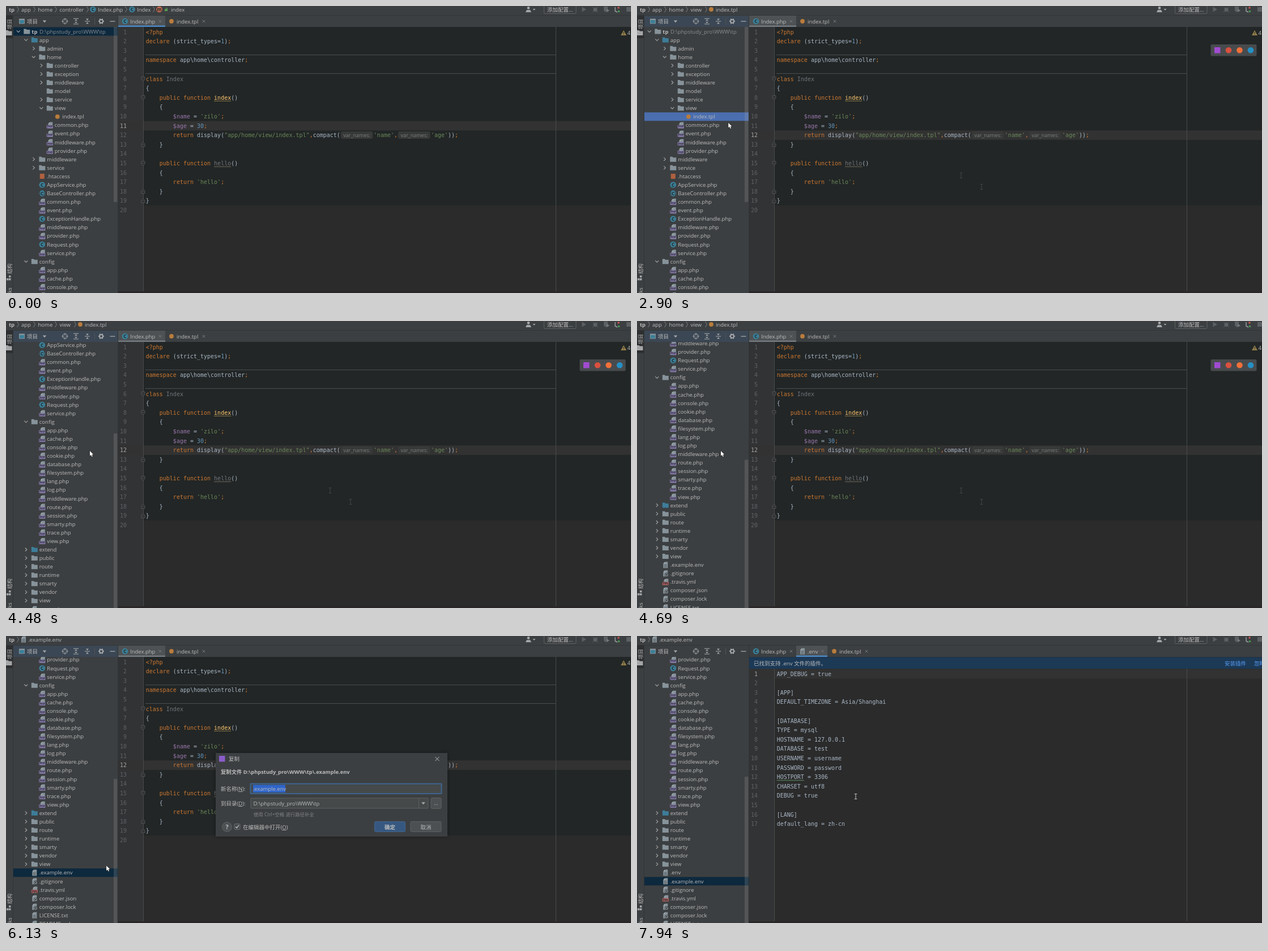
Recreate the animation shown at these times as an HTML page with a canvas. Size 1103 by 508 pixels, loop 8 s.

```html
<!DOCTYPE html>
<html lang="zh">
<head>
<meta charset="utf-8">
<title>IDE</title>
<style>
html, body { margin: 0; width: 100%; height: 100%; overflow: hidden; background: #2b2b2b; }
canvas { display: block; }
</style>
</head>
<body>
<canvas id="stage" width="1103" height="508"></canvas>
<script>
const g = document.getElementById('stage').getContext('2d');
const FAMILY = '"Open Sans", "Noto Sans CJK SC", "Noto Sans CJK", sans-serif';
const UI = '9.5px ' + FAMILY, BOLD = 'bold ' + UI, SMALL = '8.4px ' + FAMILY;
const MONO = '10px "DejaVu Sans Mono", monospace';
const CHAR = 6.02, LINE = 16.6, ROW = 15.08;
const PANEL = '#3c3f41', FG = '#bbbbbb', ICON = '#a4a6a8', CODE = '#a9b7c6', DIM = '#606366';

// moments of hard change, in ms
const POPUP = 470, CLICK_CODE = 1380, CLICK_TPL = 2760, SCROLL = 4340, CLICK_ENV = 5700,
  DIALOG = 6130, RENAME = 6930, CLOSE = 7130, OPEN = 7200, SQUIGGLE = 7460;

// depth, kind, name
const TREE = `0vtp
1oapp
2>admin
2vhome
3>controller
3>exception
3>middleware
3dmodel
3>service
3vview
4tindex.tpl
3pcommon.php
3pevent.php
3pmiddleware.php
3pprovider.php
2>middleware
2>service
2h.htaccess
2cAppService.php
2aBaseController.php
2pcommon.php
2pevent.php
2cExceptionHandle.php
2pmiddleware.php
2pprovider.php
2cRequest.php
2pservice.php
1vconfig
2papp.php
2pcache.php
2pconsole.php
2pcookie.php
2pdatabase.php
2pfilesystem.php
2plang.php
2plog.php
2pmiddleware.php
2proute.php
2psession.php
2psmarty.php
2ptrace.php
2pview.php
1eextend
1>public
1>route
1>runtime
1>smarty
1>vendor
1>view
1x.example.env
1g.gitignore
1y.travis.yml
1jcomposer.json
1jcomposer.lock
1xLICENSE.txt
1xREADME.md`.split('\n');
const TREE_NEW = TREE.flatMap(r => r === '1x.example.env' ? ['1x.env', r] : [r]);

const PHP = String.raw`<?php
declare (strict_types=1);

namespace app\home\controller;

class Index
{
    public function index()
    {
        $name = 'zilo';
        $age = 30;
        return display("app/home/view/index.tpl",compact(@'name',@'age'));
    }

    public function hello()
    {
        return 'hello';
    }
}
`.split('\n');

const ENV = `APP_DEBUG = true

[APP]
DEFAULT_TIMEZONE = Asia/Shanghai

[DATABASE]
TYPE = mysql
HOSTNAME = 127.0.0.1
DATABASE = test
USERNAME = username
PASSWORD = password
HOSTPORT = 3306
CHARSET = utf8
DEBUG = true

[LANG]
default_lang = zh-cn`.split('\n');

// pointer path: time, x, y
const PATH = [[400, 950, 465], [610, 682, 346], [680, 608, 320], [750, 572, 300], [960, 474, 237],
  [1180, 500, 231], [1580, 500, 231], [1860, 278, 231], [2130, 150, 208], [2430, 121, 201],
  [2760, 121, 201], [3520, 338, 232], [3590, 349, 232], [3720, 349, 232], [4010, 148, 230],
  [5230, 148, 230], [5500, 103, 420], [5600, 104, 428], [5910, 103, 419], [6060, 103, 419],
  [6330, 385, 371], [7800, 385, 371], [7940, 386, 284], [8000, 386, 284]];

function rect(x, y, w, h, fill) { g.fillStyle = fill; g.fillRect(x, y, w, h); }
function box(x, y, w, h, fill, stroke, r = 2, width = 1) {
  g.beginPath();
  g.roundRect(x, y, w, h, r);
  if (fill) { g.fillStyle = fill; g.fill(); }
  if (stroke) { g.strokeStyle = stroke; g.lineWidth = width; g.stroke(); }
}
function trace(x, y, pts) {
  g.beginPath();
  for (let i = 0; i < pts.length; i += 2) g.lineTo(x + pts[i], y + pts[i + 1]);
}
function poly(x, y, fill, ...pts) { trace(x, y, pts); g.fillStyle = fill; g.fill(); }
function line(x, y, stroke, width, ...pts) {
  trace(x, y, pts);
  g.strokeStyle = stroke; g.lineWidth = width; g.stroke();
}
function dot(x, y, r, fill) { g.beginPath(); g.arc(x, y, r, 0, 7); g.fillStyle = fill; g.fill(); }
function ring(x, y, r, stroke, width = 1) {
  g.beginPath(); g.arc(x, y, r, 0, 7);
  g.strokeStyle = stroke; g.lineWidth = width; g.stroke();
}
// y is the middle of the line
function text(s, x, y, fill = FG, font = UI, align = 'left') {
  g.font = font; g.fillStyle = fill; g.textAlign = align;
  g.fillText(s, x, y + 3.5);
  return g.measureText(s).width;
}
function upright(s, x, y, fill = FG) {
  g.save(); g.translate(x, y); g.rotate(-Math.PI / 2);
  text(s, 0, 0, fill, '9px ' + FAMILY, 'center');
  g.restore();
}
function squiggle(x, y, w, color) {
  const pts = [];
  for (let i = 0; i <= w; i += 1.5) pts.push(i, i / 1.5 % 2 ? -0.8 : 0.8);
  line(x, y, color, 0.9, ...pts);
}
function chevron(x, y, open) {
  if (open) line(x, y, ICON, 1.1, -3, -1.6, 0, 1.5, 3, -1.6);
  else line(x, y, ICON, 1.1, -1.5, -3, 1.6, 0, -1.5, 3);
}
function cross(x, y, r, color) {
  line(x, y, color, 1, -r, -r, r, r);
  line(x, y, color, 1, -r, r, r, -r);
}

function folder(x, y, fill) { poly(x, y, fill, -5.5, -4.5, -1.5, -4.5, 0, -3, 5.5, -3, 5.5, 4.5, -5.5, 4.5); }
function sheet(x, y) {
  poly(x, y, '#87939a', -0.5, -5.5, 4, -5.5, 4, 5.5, -4, 5.5, -4, -2);
  poly(x, y, '#a9b3b9', -4, -2.6, -1.1, -5.5, -1.1, -2.6);
}
function letter(x, y, fill, s) {
  dot(x, y, 5.3, fill);
  text(s, x, y - 0.4, '#22282b', 'bold 8.5px ' + FAMILY, 'center');
}
function badge(x, y, fill, s) {
  sheet(x + 1, y);
  rect(x - 5.5, y, 11, 5.5, fill);
  text(s, x, y + 1, '#2b2b33', 'bold 4.8px ' + FAMILY, 'center');
}
function icon(kind, x, y) {
  if ('v>d'.includes(kind)) folder(x, y, '#87939a');
  else if ('oe'.includes(kind)) folder(x, y, '#3d7d99');
  else if (kind === 'p') badge(x, y, '#8c7fb4', 'PHP');
  else if (kind === 'y') badge(x, y, '#b55e5c', 'YML');
  else if (kind === 't') dot(x, y, 3.9, '#b87c3c');
  else if (kind === 'h') rect(x - 4, y - 4.5, 8, 9, '#b0603f');
  else if (kind === 'm') letter(x, y, '#c06c4e', 'm');
  else if ('ca'.includes(kind)) {
    letter(x, y, '#3b8099', 'C');
    if (kind === 'a') for (const d of [-4, 4]) rect(x + d - 0.5, y - 5, 1, 10, PANEL);
  } else {
    sheet(x, y);
    if (kind === 'x') for (const d of [-0.5, 1.5, 3.5]) rect(x - 2.5, y + d, 5, 0.8, '#4b5256');
    else { dot(x + 2, y + 2.5, 3.4, PANEL); ring(x + 2, y + 2.5, 2, '#87939a', 1.2); }
  }
}

function crumbs(t) {
  rect(0, 0, 1103, 17, PANEL);
  text('tp', 5, 6, FG, BOLD);
  const sep = (...xs) => xs.forEach(x => line(x, 6, '#7c7f81', 1, -1.5, -5, 1.5, 0, -1.5, 5));
  sep(21);
  if (t >= CLICK_ENV) {
    icon('x', 31, 6);
    text('.example.env', 39, 6);
  } else {
    text('app', 27, 6);
    text('home', 56.5, 6);
    sep(50, 88);
    if (t < CLICK_TPL) {
      sep(144, 212, 261);
      text('controller', 94.5, 6);
      icon('c', 153.5, 6); text('Index.php', 162, 6);
      icon('c', 222.5, 6); text('Index', 231, 6);
      icon('m', 270.5, 6); rect(280, 5.5, 5, 3.5, '#5a9e55'); ring(283.5, 5, 1.5, '#5a9e55');
      text('index', 291, 6);
    } else {
      text('view', 94.5, 6);
      sep(122);
      icon('t', 131, 6); text('index.tpl', 139, 6);
    }
  }
  dot(922, 3.5, 2.4, ICON); poly(922, 6, ICON, -5, 5, -3, 1, 3, 1, 5, 5);
  poly(932, 6, ICON, -2.5, -1, 2.5, -1, 0, 1.8);
  box(949.5, -4, 56.5, 17.5, null, '#5e6060');
  text('添加配置...', 955, 6);
  const off = '#5d6062';
  poly(1020, 6, off, -3.5, -4.5, 4, 0, -3.5, 4.5);
  dot(1040, 6.5, 3.6, off); cross(1040, 6.5, 4.6, off);
  poly(1059, 5, off, -4, -4, 3, -4, 3, 3, -1, 6, -4, 3); poly(1062, 8, '#75787a', -2, -3, 3, 0, -2, 3);
  line(1078, 6, '#9da0a2', 1.4, -3, -4, -3, 3, 1, 5); dot(1081, 3, 1.8, '#c75450'); dot(1081.5, 9.5, 1.8, '#499c54');
  rect(1095, 2, 8, 8, off);
}

function sideStrip() {
  rect(0, 17, 12, 491, PANEL);
  rect(0, 17, 12, 40, '#2d2f30');
  upright('项目', 6, 32);
  folder(5, 47.5, ICON);
  upright('结构', 6, 465);
  rect(1, 482, 3.5, 3.5, ICON); rect(5, 482, 3.5, 3.5, ICON); rect(5, 477, 3.5, 3.5, ICON);
  upright('ks', 6, 503);
  rect(12, 17, 1, 491, '#323537');
}

function treePanel(t) {
  const active = t >= CLICK_TPL && t < CLOSE, focused = active && t < DIALOG;
  rect(13, 17, 185, 491, PANEL);
  rect(13, 17, 185, 20, active ? '#3b4754' : PANEL);
  rect(23, 22.5, 10, 9, '#87939a'); rect(24, 25, 8, 5.5, '#3b8099');
  text('项目', 37, 27);
  poly(68, 27, ICON, -3.2, -1.5, 3.2, -1.5, 0, 2.4);
  ring(104, 27, 4.2, ICON, 1.1);
  line(104, 27, ICON, 1, -5.5, 0, -1.5, 0); line(104, 27, ICON, 1, 1.5, 0, 5.5, 0);
  line(104, 27, ICON, 1, 0, -5.5, 0, -1.5); line(104, 27, ICON, 1, 0, 1.5, 0, 5.5);
  for (const d of [-1, 1]) {
    rect(119, 26.5 + d * 4.8, 9, 1.1, ICON);
    poly(123.5, 27, ICON, -2.5, d, 2.5, d, 0, d * 3.6);
    poly(143.5, 27, ICON, -2.5, d * 4.5, 2.5, d * 4.5, 0, d * 1.6);
  }
  rect(139, 26.5, 9, 1.1, ICON);
  rect(156, 21, 1, 12, '#505355');
  ring(168, 27, 3, ICON, 2);
  for (let a = 0; a < 6; a++) dot(168 + 4.2 * Math.cos(a * Math.PI / 3), 27 + 4.2 * Math.sin(a * Math.PI / 3), 1, ICON);
  rect(183.5, 26.5, 9, 1.3, ICON);

  const p = Math.min(1, (t - SCROLL + 69) / 829);
  const scroll = t < SCROLL ? 0 : 365 * (1 - (1 - p) ** 4.75);
  const selected = t < CLICK_TPL ? 'tp' : t < CLICK_ENV ? 'index.tpl' : '.example.env';
  g.save();
  g.beginPath(); g.rect(13, 37, 184, 471); g.clip();
  (t < OPEN ? TREE : TREE_NEW).forEach((row, i) => {
    const y = 45 + i * ROW - scroll;
    if (y < 28 || y > 516) return;
    const kind = row[1], name = row.slice(2), x = 45.3 + 13.5 * row[0];
    if (name === selected) rect(13, y - 7.5, 184, 15, focused ? '#4b6eaf' : '#0d293e');
    if ('vo>e'.includes(kind)) chevron(x - 23.5, y, 'vo'.includes(kind));
    icon(kind, x - 8.5, y);
    text(name, x, y, FG, i ? UI : BOLD);
    if (!i) text('D:\\phpstudy_pro\\WWW\\tp', 59, y, '#8a8d8f');
  });
  rect(190, 37 + scroll * (t < OPEN ? 0.592 : 0.581), 6.5, 310, 'rgba(166,166,166,.22)');
  g.restore();
  rect(197, 17, 1, 491, '#323537');
}

function tabs(t) {
  rect(198, 17, 905, 20, PANEL);
  const opened = t >= OPEN, focused = t < CLICK_TPL || opened;
  const [x, w] = opened ? [281, 55] : [198, 83];
  rect(x, 17, w, 20, '#4e5254');
  rect(x, 34.5, w, 2.5, focused ? '#4a88c7' : '#747a80');
  const tab = (kind, name, x, close) => {
    icon(kind, x, 27);
    text(name, x + 9, 27);
    cross(close, 27, 2.3, '#75787a');
  };
  tab('c', 'Index.php', 210, 272);
  if (opened) tab('x', '.env', 292, 327.5);
  tab('t', 'index.tpl', opened ? 348 : 292, opened ? 405 : 349);
}

const KEYWORDS = /^(<\?php|declare|namespace|class|public|function|return|[;,])$/;
function tokenColor(s) {
  if (/^['"]/.test(s)) return '#6a8759';
  if (s[0] === '$') return '#9876aa';
  if (/^\d/.test(s)) return '#6897bb';
  if (KEYWORDS.test(s)) return '#cc7832';
  if (s === 'index') return '#ffc66d';
  return /^(Index|hello)$/.test(s) ? '#72737a' : CODE;
}
function phpLine(source, y) {
  let x = 246.7;
  for (const s of source.match(/'[^']*'|"[^"]*"|\$\w+|\d+|<\?php|\w+|\s+|./g) || []) {
    if (s === '@') {
      box(x + 1, y - 6.5, 56.5, 13, '#373938', null, 3);
      text('var_names:', x + 5.5, y, '#7c7e7f', '9px ' + FAMILY);
      x += 59;
      continue;
    }
    text(s, x, y, tokenColor(s), MONO);
    if (s === 'index' || s === 'hello') squiggle(x, y + 6, 30, s === 'index' ? '#a38c55' : '#7d7966');
    x += CHAR * s.length;
  }
}
function editorBase(top, lines, current, tint) {
  rect(198, 37, 905, 471, '#2b2b2b');
  if (tint) rect(242, 37, 861, 316, '#222626');
  rect(198, 37, 44, 471, '#313335');
  rect(198, top + LINE * (current - 1) - 8.3, 905, LINE, '#323232');
  rect(242, 37, 1, 471, '#484b4d');
  rect(970, 37, 1, 471, '#4a4a4a');
  lines.forEach((_, i) =>
    text(i + 1, 213, top + LINE * i, i + 1 === current ? '#a4a3a3' : DIM, MONO, 'right'));
}
function phpEditor(t) {
  const top = 46, clicked = t >= CLICK_CODE;
  editorBase(top, PHP, clicked ? 12 : 11, true);
  rect(246, 86, 724, 1, '#4b4e4e');
  rect(246, 119, 724, 1, '#4b4e4e');
  PHP.forEach((s, i) => phpLine(s, top + LINE * i));
  for (const n of [6, 8, 13, 15, 18, 19]) {
    const y = top + LINE * (n - 1), d = [6, 8, 15].includes(n) ? 1 : -1;
    const mark = [-3, -3.5 * d, 3, -3.5 * d, 3, d, 0, 3.8 * d, -3, d, -3, -3.5 * d];
    poly(242, y, '#2b2d2e', ...mark);
    line(242, y, '#585b5d', 0.9, ...mark);
    line(242, y, '#585b5d', 0.9, -1.5, 0, 1.5, 0);
  }
  if (clicked && t < CLICK_TPL && Math.floor((t - CLICK_CODE) / 500) % 2 === 0) rect(499.3, 221.5, 1.3, 14, '#dddddd');
  // pointer traces left on the screen
  if (t > 680) beam(608, 320, '#434747');
  if (t > 750) beam(572, 300, '#434747');
  poly(1090, 47.5, '#94804a', 0, -4.5, 5, 4.5, -5, 4.5);
  rect(1089.5, 46, 1.1, 3, '#2b2b2b'); rect(1089.5, 50, 1.1, 1, '#2b2b2b');
  text('4', 1096.5, 47.5);
  if (t >= POPUP && t < CLICK_ENV) {
    box(1012.5, 68, 81, 20.5, '#484b4d', null, 2);
    rect(1019, 73, 10.5, 10.5, '#a04bd0');
    dot(1044, 78.3, 5.3, '#d9503f');
    dot(1063.5, 78.3, 5.3, '#f0703a');
    dot(1083, 78.3, 5.3, '#2590c4');
  }
}
function envEditor(t) {
  const top = 67;
  editorBase(top, ENV, 1, false);
  rect(198, 37.5, 905, 20.5, '#1c3956');
  text('已找到支持 .env 文件的插件。', 206, 48);
  text('安装插件', 1037, 48, '#589df6');
  text('忽略', 1089, 48, '#589df6');
  ENV.forEach((s, i) => text(s, 246.7, top + LINE * i, CODE, MONO));
  if (t >= SQUIGGLE) squiggle(246.7, 255.5, 48, '#659c6b');
}

function label(pre, key, post, x, y) {
  const w = text(pre, x, y), k = text(key, x + w, y);
  text(post, x + w + k, y);
  rect(x + w, y + 5, k, 0.9, FG);
}
function dialog(t) {
  g.shadowColor = 'rgba(0,0,0,.4)'; g.shadowBlur = 6;
  rect(370, 207, 409, 148, PANEL);
  g.shadowBlur = 0;
  rect(376, 212, 10.5, 10.5, '#8a5cc8');
  text('复制', 393, 217.5);
  cross(761, 217.5, 3.5, FG);
  text('复制文件 D:\\phpstudy_pro\\WWW\\tp\\.example.env', 379, 240.5, FG, 'bold 9.35px ' + FAMILY);
  label('新名称(', 'N', '):', 379, 270);
  box(431.5, 261.5, 337, 17.5, '#45494a', '#3d6590', 1, 2);
  if (t < RENAME) {
    rect(436, 263.5, 57, 13.5, '#2f65ca');
    text('.example.env', 435.5, 270);
  } else text('.env', 435.5, 270);
  label('到目录(', 'D', '):', 379, 296);
  box(432, 287, 313, 18, '#45494a', '#5e6060', 1);
  line(728.5, 287, '#5e6060', 1, 0, 0, 0, 18);
  poly(736.5, 296, ICON, -3.5, -1.8, 3.5, -1.8, 0, 2.2);
  text('D:\\phpstudy_pro\\WWW\\tp', 436.5, 296);
  box(750, 286.5, 18, 19, '#4c5052', '#5e6060');
  text('...', 759, 295.5, FG, UI, 'center');
  text('使用 Ctrl+空格 进行路径补全', 437, 315, '#808284', SMALL);
  dot(390, 338, 8.5, '#4c5052'); ring(390, 338, 8.5, '#5e6060');
  text('?', 390, 338, FG, 'bold 11px ' + FAMILY, 'center');
  box(403, 332.5, 10, 10, '#43494a', '#6b6b6b', 1.5);
  line(408, 337.5, FG, 1.4, -2.8, 0, -0.8, 2.3, 3, -2.8);
  label('在编辑器中打开(', 'O', ')', 418, 338);
  box(650.5, 328.5, 54, 18, '#365880', '#43658c');
  text('确定', 677.5, 338, FG, BOLD, 'center');
  box(714, 328.5, 54, 18, '#4c5052', '#5e6060');
  text('取消', 741, 338, FG, UI, 'center');
}

function beam(x, y, color) {
  line(x, y, color, 1, 0, -4.5, 0, 4.5);
  for (const d of [-4.5, 4.5]) line(x, y, color, 1, -2.3, d, 2.3, d);
}
function pointer(t, inDialog) {
  const i = PATH.findIndex(k => k[0] > t);
  if (i < 1) return;
  const [t0, x0, y0] = PATH[i - 1], [t1, x1, y1] = PATH[i], p = (t - t0) / (t1 - t0);
  const x = x0 + (x1 - x0) * p, y = y0 + (y1 - y0) * p;
  if (x > 242 && !inDialog) return beam(x, y, '#c4c4c4');
  const arrow = [0, 0, 0, 8.8, 2, 7, 3.6, 10.2, 5, 9.5, 3.5, 6.5, 6.2, 6.3, 0, 0];
  line(x, y, '#222222', 1.2, ...arrow);
  poly(x, y, '#ffffff', ...arrow);
}

function draw() {
  const t = performance.now() % 8000, inDialog = t >= DIALOG && t < CLOSE;
  (t < OPEN ? phpEditor : envEditor)(t);
  rect(198, 505, 905, 3, '#2a2627');
  crumbs(t);
  sideStrip();
  treePanel(t);
  tabs(t);
  rect(0, 16, 1103, 1, '#323537');
  if (inDialog) dialog(t);
  pointer(t, inDialog);
  requestAnimationFrame(draw);
}
draw();
</script>
</body>
</html>
```
